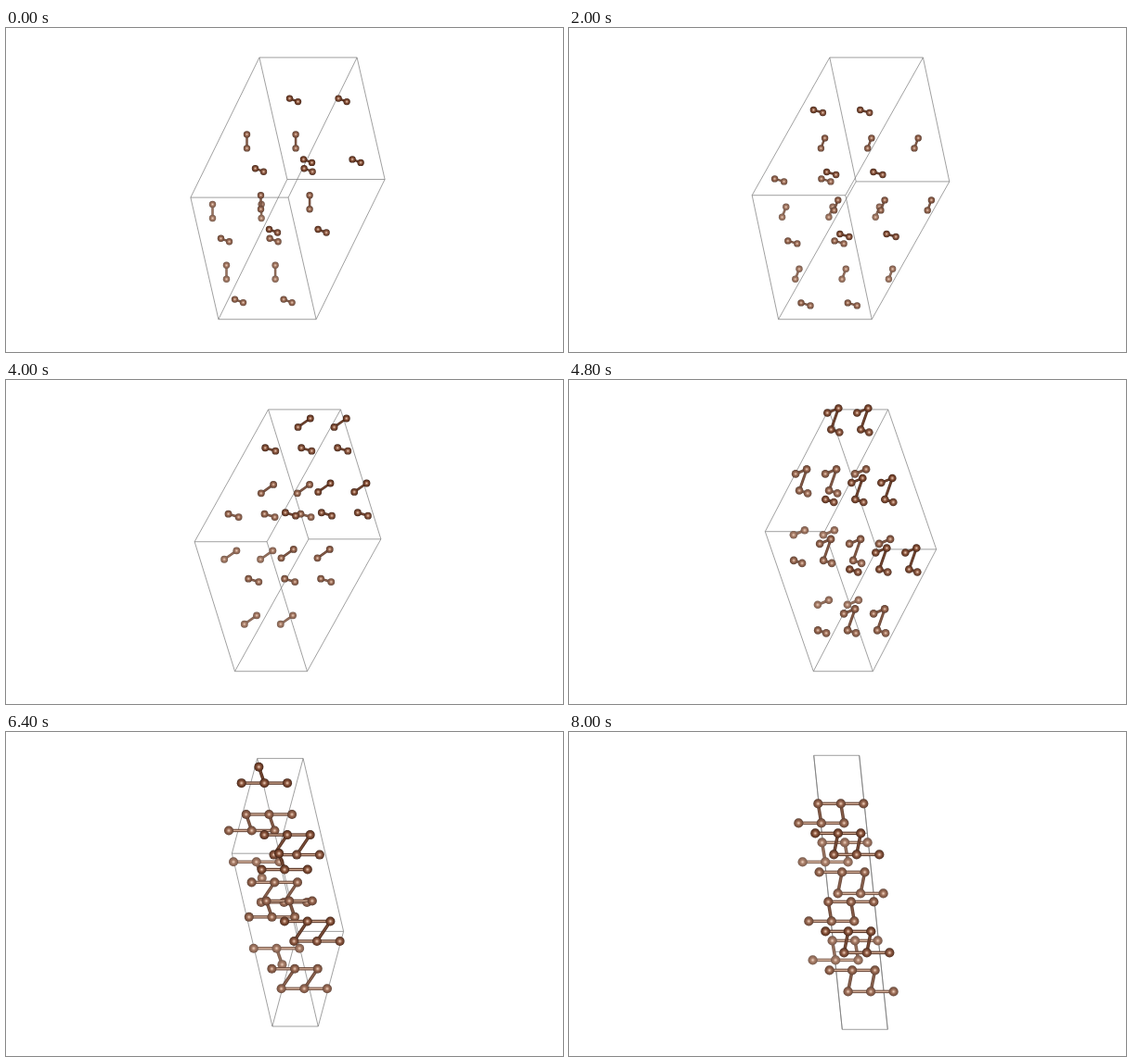
Recreate the animation shown at these times as an HTML page with a canvas. Size 600x350 px, loop 8.1 s.

```html
<!DOCTYPE html>
<html lang="en">
<head>
<meta charset="utf-8">
<title>Crystal transition</title>
<style>
html, body { margin: 0; width: 100%; height: 100%; overflow: hidden; background: #fff; }
canvas { display: block; width: 600px; height: 350px; }
</style>
</head>
<body>
<canvas id="stage" width="600" height="350"></canvas>
<script>
const ctx = document.getElementById('stage').getContext('2d');
const LOOP = 8100, STEP = 100;
const CENTER = { x: 303.5, y: 173.3 };
const LINK = 4600, CHAIN = 5500, LADDER = 6400, END = 7500;

// Key poses: time, lattice (a.x, b.x, b.y, c.x), then x,y of four basis atoms
const POSES = [
  [0,    52.6, 15,   65.8, -37,   -29.6, 6.8, -29.6, 21.8,  -20, 53.4, -11, 56.9],
  [2000, 50.3, 14.2, 67,   -41.8, -14.3, 12,  -18.5, 23,    -18, 56,   -8, 59],
  [3200, 45.5, 17,   66.5, -43,   -1.5, 20,   -12.5, 31,    -10, 60,   2.5, 62],
  [4800, 32,   26,   75.5, -34.2, 10, -2,     -2, 3,        2, 21,     11, 24],
  [5800, 25.6, 25.5, 87.5, -21.5, 2.5, 7,     7.1, -6.5,    7.6, 24,   14.7, 14.5],
  [8000, 24.5, 11,   106,  4.3,   -0.3, 9.5,  14.5, -22.5,  3.2, 30.5, 34.5, 0.5]
];
const DEPTH = [-0.5, -0.3, -0.3, 0];

// First atom, second atom, shift along a, from, until
const BONDS = [
  [0, 1, 0, 0, CHAIN], [2, 3, 0, 0, CHAIN],
  [0, 2, 0, LINK, LOOP], [1, 3, -1, LADDER, LOOP],
  ...[0, 1, 2, 3].map(i => [i, i, 1, CHAIN, LOOP])
];

// All cells of a block, from its first cell and its size along a, b, c
function block([a, b, c], [na, nb, nc]) {
  return Array.from({ length: na * nb * nc }, (_, n) =>
    [a + n % na, b + Math.floor(n / na) % nb, c + Math.floor(n / na / nb)]);
}

// Cells in which each basis atom is visible
function visibleCells(t) {
  const pairs = (v, h) => [v, v, h, h];
  if (t < 1000) return pairs(block([1, 0, 1], [2, 2, 2]), block([0, 1, -1], [2, 2, 3]));
  if (t < 2600) return pairs(block([1, 0, 1], [3, 2, 2]), block([0, 0, 0], [2, 3, 2]));
  if (t < LINK) return pairs(block([1, 0, 0], [2, 2, 3]), block([0, 0, 0], [3, 2, 2]));

  const low = block([-1, 1, 0], [3, 2, 2]);
  if (t < CHAIN) {
    const linked = block([0, 0, 0], [2, 3, 2]);
    return pairs([...linked, ...block([1, 0, 1], [2, 2, 2])], [...linked, ...low]);
  }
  const upper = block([0, 0, 1], [3, 2, 2]);
  if (t >= END) return [upper, low, block([-1, 0, 1], [3, 2, 2]), low];
  return [
    [...upper, ...block([0, 0, 0], [1, 2, 1])],
    low,
    [...block([-1, 0, 0], [3, 2, 2]), ...block([1, 0, 2], [1, 2, 1])],
    t < LADDER ? block([-2, 1, 0], [3, 2, 2]) : low
  ];
}

const clamp = (v, lo, hi) => Math.min(hi, Math.max(lo, v));
const smooth = u => { u = clamp(u, 0, 1); return u * u * (3 - 2 * u); };

function slope(i, n) {
  const p = POSES[Math.max(i - 1, 0)], q = POSES[Math.min(i + 1, POSES.length - 1)];
  const s = (q[n] - p[n]) / (q[0] - p[0]);
  return i === POSES.length - 1 ? s / 2 : s;
}

// Smooth curve through the key poses
function poseAt(t) {
  let i = 0;
  while (i < POSES.length - 2 && t >= POSES[i + 1][0]) i++;
  const p = POSES[i], q = POSES[i + 1], d = q[0] - p[0];
  const u = (t - p[0]) / d, u2 = u * u, u3 = u2 * u;
  return p.map((v, n) => (2 * u3 - 3 * u2 + 1) * v + (u3 - 2 * u2 + u) * d * slope(i, n)
    + (3 * u2 - 2 * u3) * q[n] + (u3 - u2) * d * slope(i + 1, n));
}

const HAZE = [240, 222, 208];
const shade = (rgb, fog) =>
  `rgb(${rgb.map((v, k) => Math.round(v + (HAZE[k] - v) * fog)).join(',')})`;

function line(p, q, width, color) {
  ctx.lineWidth = width;
  ctx.strokeStyle = color;
  ctx.beginPath();
  ctx.moveTo(p.x, p.y);
  ctx.lineTo(q.x, q.y);
  ctx.stroke();
}

function drawAtom({ x, y, fog }, r) {
  const g = ctx.createRadialGradient(x, y, 0, x, y, r);
  g.addColorStop(0, shade([236, 208, 190], fog));
  g.addColorStop(0.22, shade([190, 144, 120], fog));
  g.addColorStop(0.48, shade([128, 76, 52], fog));
  g.addColorStop(0.75, shade([104, 58, 38], fog));
  g.addColorStop(1, shade([56, 28, 16], fog));
  ctx.fillStyle = g;
  ctx.beginPath();
  ctx.arc(x, y, r, 0, 2 * Math.PI);
  ctx.fill();
}

// Bonds along a catch the light
function drawBond(p, q, r) {
  const fog = (p.fog + q.fog) / 2, lit = p.i === q.i;
  line(p, q, r * 0.68, shade([80, 43, 28], fog));
  line(p, q, r * 0.26, shade(lit ? [206, 166, 142] : [118, 72, 50], fog));
}

function drawCell(place) {
  for (let n = 0; n < 8; n++) {
    for (const bit of [1, 2, 4]) {
      if (n & bit) continue;
      const corner = m => place(m & 1 ? 2 : 0, m & 2 ? 2 : 0, m & 4 ? 2 : 0);
      line(corner(n), corner(n | bit), 0.7, '#777');
    }
  }
}

function draw(t) {
  const [, ax, bx, by, cx, ...basis] = poseAt(t);
  const cy = 141.4 + 6.6 * clamp((t - 4800) / 3200, 0, 1) - by;
  const r = 3.7 + 1.4 * smooth((t - 3000) / 4000);
  // Cell indices count half edges, so (1, 1, 1) is the middle
  const place = (a, b, c) => ({
    x: CENTER.x + (a - 1) * ax + (b - 1) * bx + (c - 1) * cx,
    y: CENTER.y + (b - 1) * by + (c - 1) * cy
  });
  const atoms = new Map(), parts = [];

  ctx.fillStyle = '#fff';
  ctx.fillRect(0, 0, 600, 350);
  drawCell(place);

  visibleCells(t).forEach((cells, i) => {
    for (const [a, b, c] of cells) {
      const p = place(a, b, c), z = c + DEPTH[i];
      atoms.set([i, a, b, c].join(), {
        x: p.x + basis[2 * i] + 0.6, y: p.y + basis[2 * i + 1] + 0.6,
        z, fog: clamp(0.14 * (z + 0.5), 0, 0.4), i, a, b, c
      });
    }
  });

  for (const p of atoms.values()) {
    parts.push([p.z, () => drawAtom(p, r)]);
    for (const [i, j, shift, from, until] of BONDS) {
      if (p.i !== i || t < from || t >= until) continue;
      const q = atoms.get([j, p.a + shift, p.b, p.c].join());
      if (q) parts.push([Math.max(p.z, q.z) + 0.01, () => drawBond(p, q, r)]);
    }
  }
  parts.sort((p, q) => q[0] - p[0]).forEach(p => p[1]());
}

const start = performance.now();
function tick() {
  const t = (performance.now() - start) % LOOP;
  draw(Math.floor(t / STEP) * STEP);
  requestAnimationFrame(tick);
}
tick();
</script>
</body>
</html>
```
